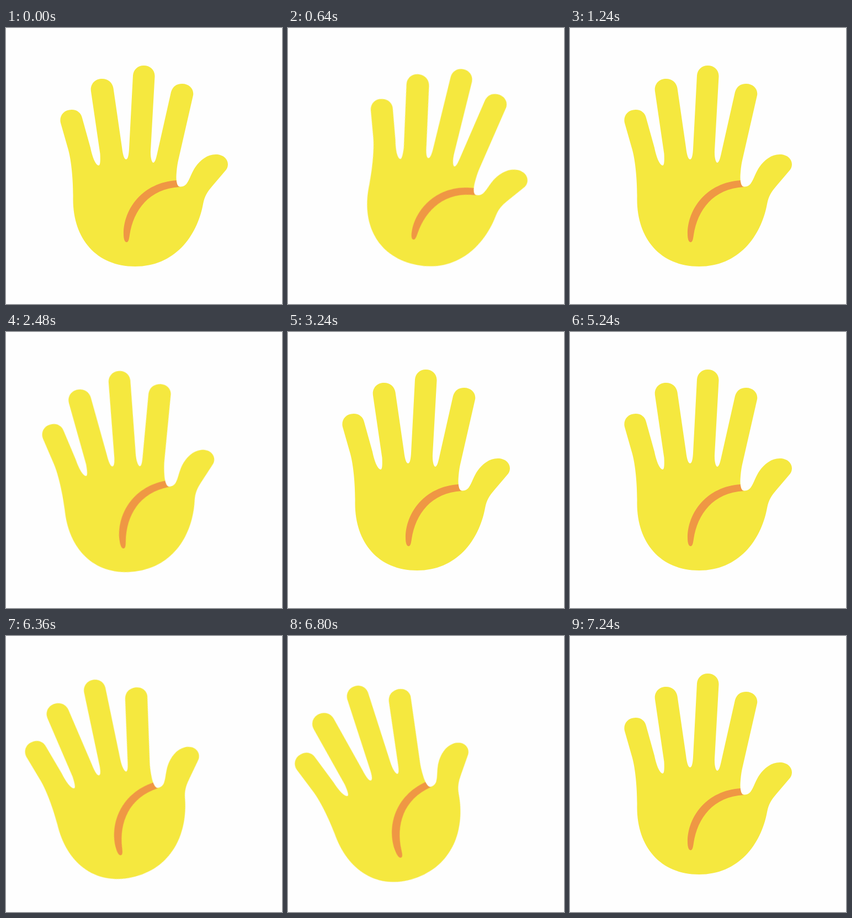
Animation of 500 by 500 pixels, one loop 8000 ms. Source, as an HTML page without scripts:

```html
<!DOCTYPE html>
<html lang="en">
<head>
<meta charset="utf-8">
<title>Waving hand</title>
<style>
  html, body {
    margin: 0;
    height: 100%;
    overflow: hidden;
    background: #fefefe;
  }

  svg {
    display: block;
    width: 100%;
    height: 100%;
  }

  .hand {
    --left: rotate(-21deg);
    --right: rotate(16deg);
    transform-origin: 248px 431.5px;
    animation: wave 2s 3ms infinite;
  }

  .skin { fill: #f5e83f; }
  .crease { fill: #ef9744; }

  /* A short hold, a brisk start, then swings that flatten out at each turn. */
  @keyframes wave {
    0% {
      transform: rotate(0deg);
      animation-timing-function: step-end;
    }
    1.8% {
      transform: rotate(3.2deg);
      animation-timing-function: cubic-bezier(.2, .25, .8, 1);
    }
    10%, 30% {
      transform: var(--right);
      animation-timing-function: cubic-bezier(.167, 0, .833, 1);
    }
    20%, 40% {
      transform: var(--left);
      animation-timing-function: cubic-bezier(.167, 0, .833, 1);
    }
    50% {
      transform: var(--right);
      animation-timing-function: cubic-bezier(.167, 0, .833, .833);
    }
    60%, 100% { transform: rotate(0deg); }
  }
</style>
</head>
<body>
<svg viewBox="0 0 500 500">
  <g class="hand">
    <path class="skin" d="
      M99 172 C96 160 104 148 119 148 C129 148 136 154 138 163
      L153 217 C156 232 162 249 168 249 C171 249 171 238 170.5 228
      L154 115 C152 101 162 92 174 92 C185 92 193 99 194.5 109
      L210 216 C211.5 229 214 238 217.5 238 C221 238 222.5 229 223 219
      L230 86 C231 75 239 68 249.5 68 C261 68 270 76 269.5 88
      L262 222 C261.5 235 264 244 267 244 C270 244 272.5 234 274 227
      L299 116 C302 106 309 101 319 101 C332 101 341 111 339 122
      L312 240 C309.5 251 308.5 265 308.5 272 C309 283 311 287.5 316 287.5
      C331 287.5 331 270 343 252 C352 239 365 229 380 229
      C393 229 402 237 402 247 C402 252 400 256 397 259
      L374 286 C364 298 360 304 357 319
      C346 378 305 432 234 432 C164 432 121.5 382 121.5 310
      C122 280 119 243 113 221 Z"/>
    <path class="crease" d="
      M308.7 276 C248 280 213 327 213 373 C213 382 215 388 218.5 388
      C222 388 223 382 224 375 C231 330 259 291 315 288
      C311 287 309.5 283 308.7 276 Z"/>
  </g>
</svg>
</body>
</html>
```
